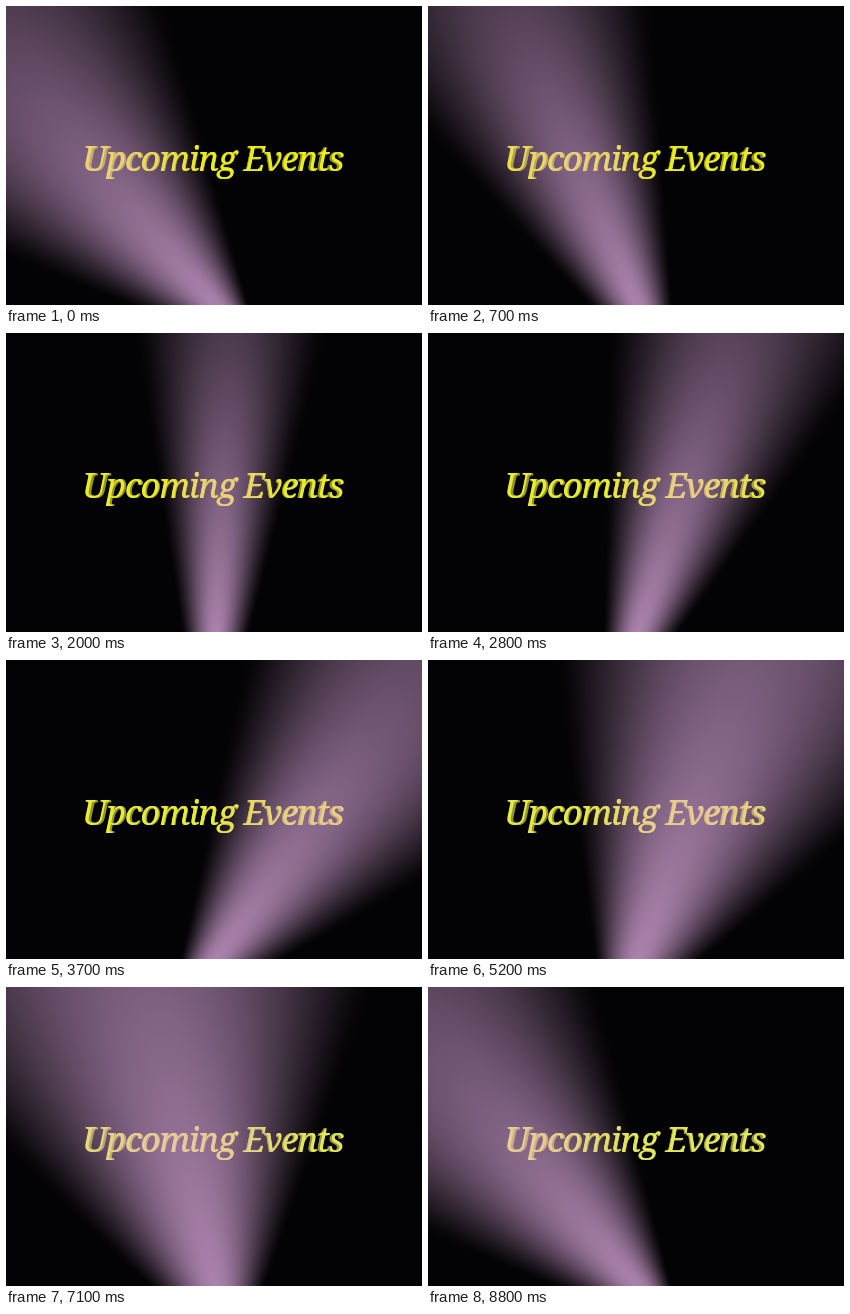
Animation, 416 px wide and 299 px high, one loop 8900 ms. Source, as an HTML page with a canvas:

```html
<!DOCTYPE html>
<html lang="en">
<head>
<meta charset="utf-8">
<title>Upcoming Events</title>
<style>
  html, body { margin: 0; width: 100%; height: 100%; overflow: hidden; background: #030204; }
  canvas { display: block; width: 100vw; height: 100vh; }
</style>
</head>
<body>
<canvas id="stage" width="416" height="299"></canvas>
<script>
const W = 416, H = 299, STEP = 100, LOOP = 8900;
const BASE = { x: 209, y: 299 };
const TEXT = 'Upcoming Events';

// time, left edge angle, right edge angle (degrees from vertical), lamp radius, falloff per pixel
const POSES = [
  [0, -68, -15.5, 32, 0.0014],
  [700, -43, -4, 35, 0.0016],
  [2000, -9, 14.5, 33, 0.0019],
  [3700, 12, 60, 34, 0.0012],
  [4000, 16, 65, 35, 0.0012],
  [5200, -7.5, 50, 42, 0.001],
  [7100, -46, 20, 46, 0.0009],
  [8800, -67, -14, 33, 0.0012]
];

function layer() {
  const c = document.createElement('canvas');
  c.width = W;
  c.height = H;
  return c.getContext('2d');
}

const stage = document.getElementById('stage').getContext('2d');
const title = layer();
const tint = layer();
const beamPixels = stage.createImageData(W, H);
const tintPixels = tint.createImageData(W, H);

function setTitleFont(size) {
  title.font = `italic ${size}px "Noto Serif", serif`;
  title.fontStretch = 'condensed';
  title.letterSpacing = '-1px';
}

setTitleFont(40);
const fontSize = Math.min(42, 40 * 264 / title.measureText(TEXT).width);
setTitleFont(fontSize);

function poseAt(t) {
  let i = 0;
  while (i < POSES.length - 2 && POSES[i + 1][0] <= t) i++;
  const from = POSES[i], to = POSES[i + 1];
  const k = Math.min(1, (t - from[0]) / (to[0] - from[0]));
  return from.map((v, j) => v + (to[j] - v) * k);
}

function setPixel(data, i, r, g, b, a) {
  data[i] = r;
  data[i + 1] = g;
  data[i + 2] = b;
  data[i + 3] = a;
}

function paintBeam(t) {
  const [, left, right, radius, falloff] = poseAt(t);
  const rad = Math.PI / 180;
  const cl = Math.cos(left * rad), sl = Math.sin(left * rad);
  const cr = Math.cos(right * rad), sr = Math.sin(right * rad);
  for (let y = 0, i = 0; y < H; y++) {
    const dy = y - BASE.y;
    for (let x = 0; x < W; x++, i += 4) {
      const dx = x - BASE.x;
      const a = radius + dx * cl + dy * sl;
      const b = radius - dx * cr - dy * sr;
      let light = 0;
      if (a > 0 && b > 0) {
        const across = Math.sin(Math.PI * a / (a + b)) ** 1.3;
        light = across * Math.max(0, 1 - falloff * Math.hypot(dx, dy));
      }
      setPixel(beamPixels.data, i, 3 + 167 * light, 2 + 128 * light, 4 + 168 * light, 255);
      setPixel(tintPixels.data, i, 236, 188, 186, 200 * light);
    }
  }
  stage.putImageData(beamPixels, 0, 0);
  tint.putImageData(tintPixels, 0, 0);
}

function drawWords(scale, color) {
  const cx = 209, cy = 151;
  title.setTransform(scale, 0, 0, scale, cx * (1 - scale), cy * (1 - scale));
  title.fillStyle = color;
  title.fillText(TEXT, 76, 165);
}

function paintTitle(t) {
  const pale = Math.min(1, t / 7200);
  title.setTransform(1, 0, 0, 1, 0, 0);
  title.globalCompositeOperation = 'source-over';
  title.clearRect(0, 0, W, H);
  // extruded sides recede towards the centre
  for (let s = 0.98; s < 0.999; s += 0.004) {
    drawWords(s, `rgb(150,150,${22 + 38 * pale})`);
  }
  drawWords(1, `rgb(${234 - 8 * pale},${238 - 6 * pale},${28 + 62 * pale})`);
  title.setTransform(1, 0, 0, 1, 0, 0);
  title.globalCompositeOperation = 'source-atop';
  title.drawImage(tint.canvas, 0, 0);
  stage.drawImage(title.canvas, 0, 0);
}

let shown = -1;
function frame() {
  const t = Math.floor((performance.now() % LOOP) / STEP) * STEP;
  if (t !== shown) {
    shown = t;
    paintBeam(t);
    paintTitle(t);
  }
  requestAnimationFrame(frame);
}
frame();
</script>
</body>
</html>
```
